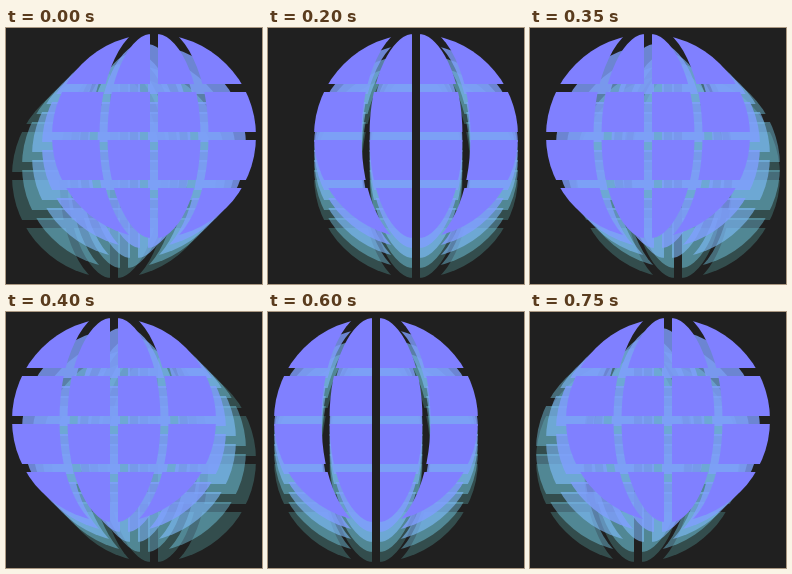
These frames come from a looping animation (256 px wide and 256 px high, 0.8 s). An HTML page:

```html
<!DOCTYPE html>
<html lang="en">
<head>
<meta charset="utf-8">
<title>Globe trail</title>
<style>
  html, body { margin: 0; width: 100%; height: 100%; overflow: hidden; background: #202020; }
  svg { display: block; width: 100vw; height: 100vh; }
</style>
</head>
<body>
<svg id="stage" viewBox="0 0 256 256">
  <defs>
    <mask id="grid" maskUnits="userSpaceOnUse" x="-104" y="-104" width="208" height="208">
      <circle r="102" fill="#fff"/>
      <g fill="none" stroke="#000" stroke-width="8">
        <path d="M0-110V110M-110-48H110M-110 0H110M-110 48H110"/>
        <ellipse rx="50.5" ry="107"/>
      </g>
    </mask>
    <g id="globe"><rect x="-104" y="-104" width="208" height="208" mask="url(#grid)"/></g>
  </defs>
  <rect width="256" height="256" fill="#202020"/>
</svg>
<script>
  const STEP = 50, STEPS = 16, LAYERS = 5;
  const SLACK = 5; // ms, keeps clock rounding from showing a step late
  const stage = document.getElementById('stage');
  const layers = [];

  // Back layer first: faint cyan, towards solid violet in front.
  for (let lag = LAYERS - 1; lag >= 0; lag--) {
    const el = document.createElementNS('http://www.w3.org/2000/svg', 'use');
    el.setAttribute('href', '#globe');
    el.setAttribute('fill', `hsl(${240 - 15 * lag}, 100%, 75%)`);
    el.setAttribute('opacity', 1 - lag / LAYERS);
    stage.appendChild(el);
    layers.push({ el, lag });
  }

  // Rest right, slide left, rest left, slide back.
  function globeX(n) {
    n = (n + STEPS) % STEPS;
    if (n <= 4) return 148;
    if (n <= 8) return 148 - 10 * (n - 4);
    if (n <= 12) return 108;
    return 108 + 10 * (n - 12);
  }

  function draw(ms) {
    const n = Math.floor((ms + SLACK) / STEP) % STEPS;
    for (const { el, lag } of layers) {
      el.setAttribute('transform', `translate(${globeX(n - lag)} ${108 + 10 * lag})`);
    }
  }

  const start = performance.now();
  function tick() {
    draw(performance.now() - start);
    requestAnimationFrame(tick);
  }
  tick();
</script>
</body>
</html>
```
